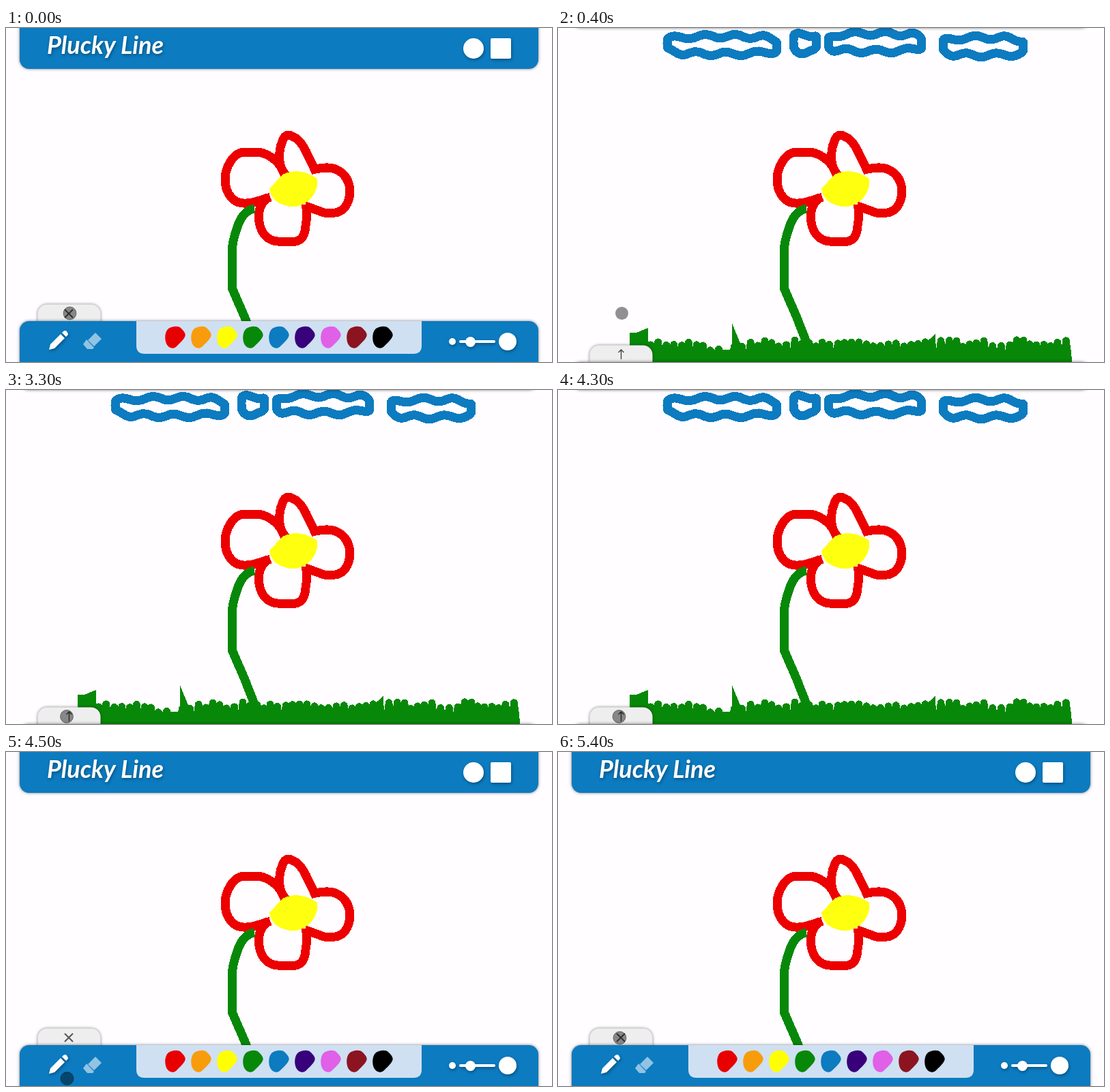
Animation of 800 by 490 pixels, one loop 5500 ms. Source, as an HTML page:

```html
<!DOCTYPE html>
<html lang="en">
<head>
<meta charset="utf-8">
<title>Drawing app</title>
<style>
  html, body { margin: 0; width: 100%; height: 100%; overflow: hidden; background: #fffdff; }
  svg { display: block; width: 800px; height: 490px; }
  .sketch { shape-rendering: crispEdges; stroke-linejoin: round; stroke-width: 13; fill: none; }
  .bar { fill: #0c7bc0; filter: drop-shadow(0 0 2px rgba(0,0,0,.5)); }
  .tab { fill: #eee; filter: drop-shadow(0 0 2px rgba(0,0,0,.5)); }
  .white { fill: #fff; filter: drop-shadow(1px 2px 2px rgba(0,0,0,.35)); }
  .title { font: italic 700 36px Lato, sans-serif; }
</style>
</head>
<body>
<svg viewBox="0 0 800 490">
  <g class="sketch">
    <path id="clouds" stroke="#0c7bc0"/>
    <g stroke="#ec0000" stroke-linecap="square">
      <path d="M406 210C398 192 380 182 366 182H348C332 184 321 205 321 222C321 245 335 257 348 257C362 258 370 253 381 250"/>
      <path d="M406 210C398 198 399 175 408 160Q413 155 420 159C434 165 440 182 451 205"/>
      <path d="M453 207C470 203 480 205 487 209C500 217 504 228 504 241C503 258 494 270 482 271H466Q455 267 444 263"/>
      <path d="M380 252C368 264 371 275 371 285C374 302 384 312 398 313H425Q438 310 439 290Q441 282 440 265"/>
    </g>
    <path fill="#ffff10" d="M386 236 405 215Q430 203 456 221Q459 236 445 252Q425 270 399 256Q388 250 386 236Z"/>
    <path stroke="#088808" d="M364 265Q346 268 338 295Q331 315 331 330V381L350 425 366 466"/>
    <path id="grass" fill="#088808"/>
  </g>

  <g id="header">
    <rect class="bar" x="20" y="-30" width="760" height="90" rx="14"/>
    <text class="white title" x="60" y="38">Plucky Line</text>
    <circle class="white" cx="685" cy="30" r="15"/>
    <rect class="white" x="710" y="15" width="30" height="30" rx="2"/>
  </g>

  <g id="footer">
    <rect class="tab" x="46.5" y="405.5" width="92" height="50" rx="14"/>
    <path id="close" d="M86 413 98 425M98 413 86 425" stroke="#555" stroke-width="2"/>
    <path id="open" d="M92.5 426V412M88.5 416 92.5 412 96.5 416" stroke="#444" stroke-width="1.4" fill="none"/>
    <rect class="bar" x="20" y="430" width="760" height="90" rx="14"/>
    <path fill="#cfe0f2" d="M191 430H609V466Q609 478 597 478H203Q191 478 191 466Z"/>
    <g id="palette"/>
    <path class="white" d="M63 472 65 464 80 449 86 455 71 470ZM82 447 84 445Q87 443 89 445L90 447Q92 449 90 451L88 453Z"/>
    <path fill="#fff" opacity=".55" d="M126 452 131 447 140 456 129 467 120 458ZM118 457 129 469 127 471H119L113 464Z"/>
    <g class="white">
      <circle cx="654" cy="460" r="5"/>
      <rect x="664" y="458" width="53" height="4" rx="2"/>
      <circle cx="680.5" cy="460.5" r="7.5"/>
      <circle cx="735" cy="460" r="13"/>
    </g>
  </g>
  <circle id="cursor" r="9.5" fill="rgba(0,0,0,.43)"/>
</svg>
<script>
const $ = id => document.getElementById(id);

let seed = 7;
const random = () => (seed = seed * 16807 % 2147483647) / 2147483647;

// A long rounded loop with a wavy upper and lower edge.
function cloud(left, right, middle) {
  const points = [];
  for (let i = 0; i < 60; i++) {
    const angle = i / 60 * 2 * Math.PI;
    const x = (left + right) / 2 + (right - left) / 2 * Math.cos(angle);
    const wave = 3 * Math.sin(x / 7 + Math.sin(angle));
    points.push([x, middle + 13 * Math.cbrt(Math.sin(angle)) + wave]);
  }
  return `M${points.join('L')}Z`;
}
$('clouds').setAttribute('d',
  cloud(160, 321, 25) + cloud(345, 379, 22) + cloud(396, 533, 21) + cloud(564, 682, 27));

// Tapered round-topped blades that merge into a lawn, thinning out near x = 239.
function lawn() {
  let path = 'M105 490V447H115L132 440V490ZM255 490V433L268 465V490ZM536 464 553 449V490H536Z';
  for (let x = 113; x < 750; x += 9 + 4 * random()) {
    const top = 452 + 10 * random() + 13 * Math.exp(-(((x - 239) / 18) ** 2));
    path += `M${x - 9} 490L${x - 5} ${top + 3}Q${x} ${top - 3} ${x + 5} ${top + 3}L${x + 9} 490Z`;
  }
  return path + 'M105 472H752V490H105Z';
}
$('grass').setAttribute('d', lawn());

const colors = ['#e80000', '#f89c0c', '#ff0', '#088808', '#0c7bc0', '#38007a', '#e060e8', '#8c1420', '#000'];
const blob = 'M-10-13C-6-16 4-18 8-14C11-11 14-8 14.5-5C16 0 8 7 3 12C-1 17-8 17-12 11C-16 5-16-8-10-13Z';
$('palette').innerHTML = colors.map((color, i) =>
  `<path d="${blob}" fill="${color}" transform="translate(${248 + 38 * i} 454)"/>`).join('');

const LOOP = 5500;
const ease = (t, from, to) => {
  const u = Math.min(1, Math.max(0, (t - from) / (to - from)));
  return u * u * (3 - 2 * u);
};
const mix = (a, b, u) => a + (b - a) * u;

function cursorAt(t) {
  if (t < 1300) {
    const u = ease(t, 650, 1200);
    return [mix(93.5, 87, u), mix(418.5, 475, u)];
  }
  if (t < 3600) return [89, 479];
  const u = ease(t, 4500, 5150);
  return [mix(89.5, 90.5, u), mix(479, 419.5, u)];
}

function draw(t) {
  const shift = 60 * (ease(t, 200, 400) - ease(t, 4300, 4500));
  $('header').setAttribute('transform', `translate(0 ${-shift})`);
  $('footer').setAttribute('transform', `translate(0 ${shift})`);
  const closed = t >= 200 && t < 4400;
  $('close').style.opacity = closed ? 0 : 1;
  $('open').style.opacity = closed ? 1 : 0;

  const [x, y] = cursorAt(t);
  const cursor = $('cursor');
  cursor.setAttribute('cx', x);
  cursor.setAttribute('cy', y);
  cursor.setAttribute('stroke', t >= 100 && t < 700 ? 'none' : 'rgba(0,0,0,.4)');
}

const start = performance.now();
function tick() {
  draw((performance.now() - start) % LOOP);
  requestAnimationFrame(tick);
}
tick();
</script>
</body>
</html>
```
